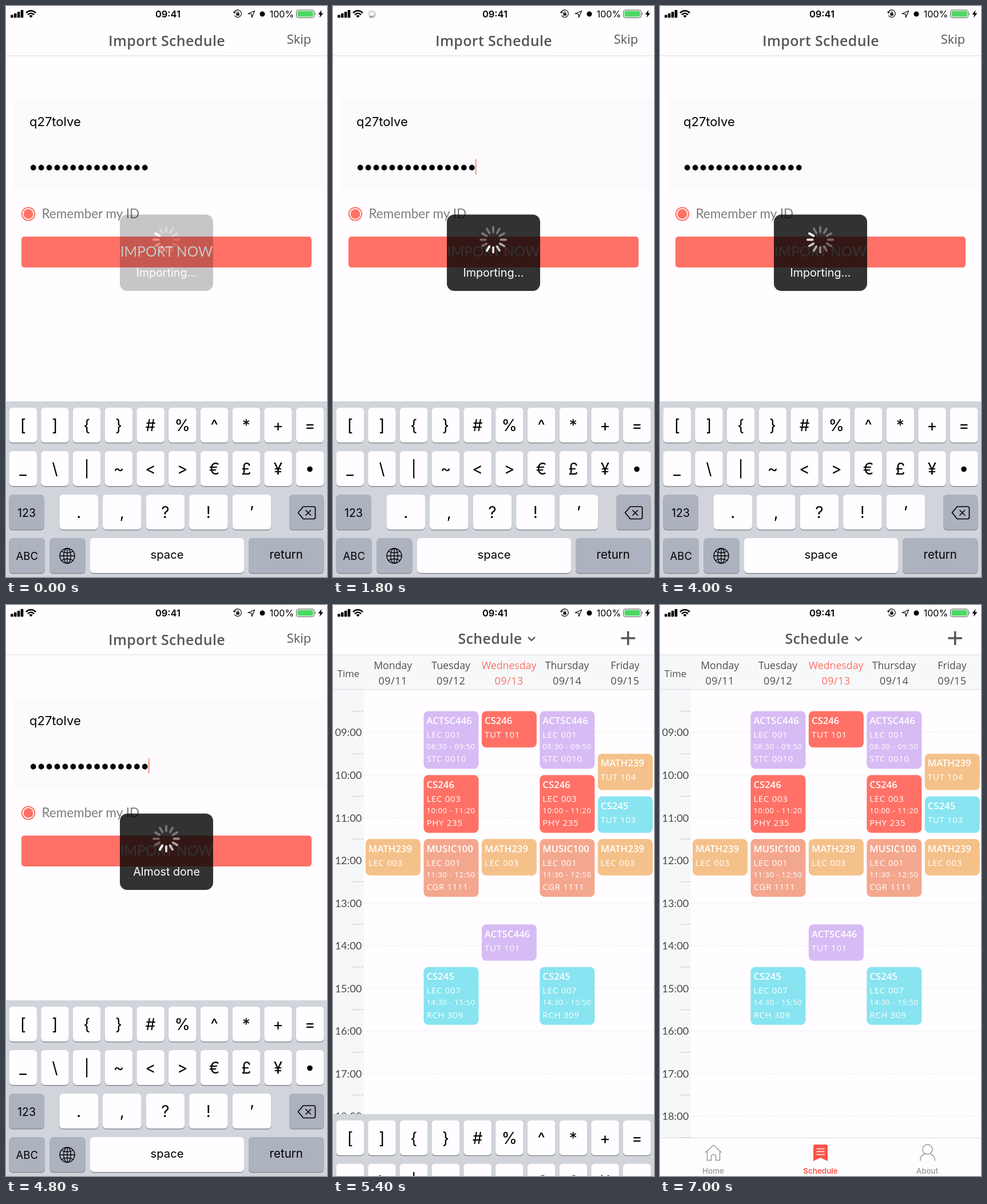
Animation of 561 by 998 pixels, one loop 7.2 s. Source, as an HTML page:

```html
<!DOCTYPE html>
<html lang="en">
<head>
<meta charset="utf-8">
<title>Import Schedule</title>
<style>
html, body { margin: 0; width: 100%; height: 100%; overflow: hidden; background: #fffdff; }
svg { display: block; width: 561px; height: 998px; }
text { white-space: pre; }
.ui { font-family: Inter, Roboto, sans-serif; }
.hand { font-family: "Open Sans", "Noto Sans", sans-serif; }
.soft { font-family: Lato, sans-serif; }
</style>
</head>
<body>
<svg id="stage" viewBox="0 0 561 998"></svg>
<script>
const LOOP = 7200, STEP = 200;
const CORAL = '#ff7166', INK = '#565658', LINE = '#d9d9dc';

const rect = (x, y, w, h, fill, r = 0, more = '') =>
  `<rect x="${x}" y="${y}" width="${w}" height="${h}" rx="${r}" fill="${fill}" ${more}/>`;
const circle = (x, y, r, fill, more = '') =>
  `<circle cx="${x}" cy="${y}" r="${r}" fill="${fill}" ${more}/>`;
const stroke = (d, color, width = 1, more = '') =>
  `<path d="${d}" fill="none" stroke="${color}" stroke-width="${width}" ${more}/>`;
const fillPath = (d, color) => `<path d="${d}" fill="${color}"/>`;
const text = (x, y, s, size, { font = 'ui', fill = '#000', anchor = 'middle', weight = 400, gap = 0 } = {}) =>
  `<text x="${x}" y="${y}" class="${font}" font-size="${size}" fill="${fill}" text-anchor="${anchor}" ` +
  `font-weight="${weight}" letter-spacing="${gap}">${s.replace(/&/g, '&amp;').replace(/</g, '&lt;')}</text>`;
const times = (n, fn) => Array.from({ length: n }, (_, i) => fn(i)).join('');
const group = (id, body) => `<g id="${id}">${body}</g>`;

const spinner = (id, x, y, inner, outer, width, color, cap) => group(id, times(12, i =>
  `<line x1="${x}" x2="${x}" y1="${y - inner}" y2="${y - outer}" stroke="${color}" stroke-width="${width}" ` +
  `stroke-linecap="${cap}" transform="rotate(${i * 30} ${x} ${y})"/>`));

function statusBar() {
  const bars = times(4, i => rect(8 + i * 5.9, 15.5 - i * 2.8, 4.6, 5 + i * 2.8, '#000', 1.2));
  const wifi = stroke('M35 12 Q43.5 4.5 52 12 M38 15.2 Q43.5 10.3 49 15.2', '#000', 2.6) +
    fillPath('M40.3 17.3 Q43.5 14.6 46.7 17.3 L43.5 20.6Z', '#000');
  const lock = stroke('M399.4 10 A6.4 6.4 0 1 1 399.4 16.5', '#000', 1.2) + fillPath('M397 10 H402 L399 13.4Z', '#000') +
    rect(402.4, 12.6, 5.4, 4.2, '#000', .6) + stroke('M403.6 13 V11.4 A1.5 1.5 0 0 1 406.6 11.4 V13', '#000', 1);
  const arrow = stroke('M423 13.5 L434.5 8.5 L429.5 20 L429 14Z', '#000', 1.2, 'stroke-linejoin="round"');
  const battery = rect(507.5, 7, 31, 13.5, 'none', 3.2, 'stroke="#555" stroke-width="1"') +
    rect(509.3, 8.8, 27.4, 9.9, '#4cd964', 1.8) + fillPath('M540 11.5 Q542.6 13.7 540 16Z', '#555');
  return bars + wifi + text(283, 20, '09:41', 16.5, { weight: 600 }) + lock + arrow +
    circle(448, 14, 4.5, '#000') + text(482, 20, '100%', 16.1) + battery +
    fillPath('M551.5 7 L545.5 14.7 H549.3 L548 20.5 L554.5 12.5 H550.6Z', '#000');
}

function importPage() {
  return rect(0, 0, 561, 998, '#fffdff') + rect(0, 86.5, 561, 1, LINE) +
    text(281, 69.5, 'Import Schedule', 25, { font: 'hand', weight: 600, fill: INK, gap: .35 }) +
    text(512, 65.5, 'Skip', 22, { font: 'hand', fill: INK }) +
    rect(14, 162, 547, 160, '#fcfafd') +
    text(41, 210, 'q27tolve', 22, { anchor: 'start' }) +
    times(15, i => circle(47.7 + i * 13.93, 282.5, 4.9, '#000')) +
    rect(248.6, 267.5, 2, 27, '#f8917f', 0, 'id="caret"') +
    circle(39, 363.5, 11.2, 'none', `stroke="${CORAL}" stroke-width="2"`) + circle(39, 363.5, 8.4, CORAL) +
    text(62.5, 371, 'Remember my ID', 22.5, { font: 'soft', fill: '#7c7b7d', anchor: 'start' }) +
    rect(27, 403, 507, 54, CORAL, 5) +
    text(280.5, 438, 'IMPORT NOW', 24.4, { font: 'soft', fill: '#fff' });
}

const HOUR = 74.55, COLUMN = 101.45;
const hourY = h => 222.7 + (h - 9) * HOUR;
const COLORS = { ACTSC446: '#d7bbf4', CS246: CORAL, MATH239: '#f5c18a', MUSIC100: '#f4a78f', CS245: '#87e4f0' };

// Sessions with a room last 80 minutes and show their hours; the others last 50.
function session(day, start, course, kind, span, room) {
  const x = 57 + day * COLUMN, y = hourY(start);
  const line = (dy, s, size, gap, weight) =>
    text(x + 5, y + dy, s, size, { font: 'hand', fill: '#fff', anchor: 'start', weight, gap });
  return rect(x, y, 96, (room ? 80 : 50) / 60 * HOUR + 1.5, COLORS[course], 8) +
    line(22.5, course, 16.6, .1, 600) + line(46.5, kind, 15, .7, 500) +
    (room ? line(66.5, span, 13, .6, 500) + line(89, room, 15, .7, 500) : '');
}

function tabBar() {
  const gray = '#98979a';
  const label = (x, s, fill, weight) => text(x, 993.5, s, 13.4, { fill, weight });
  return rect(0, 931, 561, 67, '#fdfcfe') + rect(0, 931, 561, 1, LINE) +
    stroke('M79.5 957 L93.5 944 L107.5 957 M82.5 955 V970.5 H89.5 V962.5 Q93.5 958 97.5 962.5 V970.5 H104.5 V955',
      gray, 1.5, 'stroke-linejoin="round"') +
    fillPath('M268 946 Q268 943 271 943 H290 Q293 943 293 946 V972 L280.5 966 L268 972Z', '#fb5449') +
    stroke('M273.5 950.5 H287.5 M273.5 955.5 H287.5 M273.5 960.5 H287.5', '#fff', 1.3) +
    circle(467.5, 951.5, 8.6, 'none', `stroke="${gray}" stroke-width="1.5"`) +
    stroke('M454.5 971.5 Q455 961 463 959.5 M472 959.5 Q480 961 480.5 971.5', gray, 1.5) +
    label(93, 'Home', gray, 500) + label(280.5, 'Schedule', '#fb5449', 600) + label(467, 'About', gray, 500);
}

function schedulePage() {
  const days = ['Monday', 'Tuesday', 'Wednesday', 'Thursday', 'Friday'];
  const head = days.map((day, i) => {
    const x = 104.7 + i * COLUMN, style = { font: 'hand', fill: i === 2 ? CORAL : '#4e4e50', weight: 500 };
    return text(x, 112, day, 17.7, style) + text(x, 139, `09/${11 + i}`, 18, { ...style, gap: .5 });
  }).join('');
  const grid = times(10, i => {
    const y = hourY(9 + i);
    return stroke(`M54 ${y} H561`, '#e6e5e9', 1, 'stroke-dasharray="3 2"') +
      text(3.5, y + 6.7, `${String(9 + i).padStart(2, '0')}:00`, 18.2, { font: 'soft', fill: '#48484a', anchor: 'start' });
  }) + times(11, i => stroke(`M34 ${hourY(8.5 + i)} H54`, '#aeb0b3', 1, 'stroke-dasharray="3.2 2"'));
  const pair = (...args) => session(1, ...args) + session(3, ...args);
  return rect(0, 0, 561, 998, '#fffdff') + rect(0, 87, 54, 845, '#f5f7f9') + rect(54, 87, 507, 60, '#f7f8fa') +
    rect(0, 86.5, 561, 1, LINE) + rect(0, 147, 561, 1, LINE) +
    text(274.5, 67.5, 'Schedule', 25, { font: 'hand', weight: 600, fill: INK, gap: .35 }) +
    stroke('M341 56 L347 62 L353 56', INK, 2.4) + stroke('M503.5 58 H528 M515.7 46 V70', INK, 3.6) +
    text(27, 126, 'Time', 16.7, { font: 'hand', fill: '#4e4e50', weight: 500 }) + head + grid +
    pair(8.5, 'ACTSC446', 'LEC 001', '08:30 - 09:50', 'STC 0010') +
    pair(10, 'CS246', 'LEC 003', '10:00 - 11:20', 'PHY 235') +
    pair(11.5, 'MUSIC100', 'LEC 001', '11:30 - 12:50', 'CGR 1111') +
    pair(14.5, 'CS245', 'LEC 007', '14:30 - 15:50', 'RCH 309') +
    [0, 2, 4].map(day => session(day, 11.5, 'MATH239', 'LEC 003')).join('') +
    session(2, 8.5, 'CS246', 'TUT 101') + session(2, 13.5, 'ACTSC446', 'TUT 101') +
    session(4, 9.5, 'MATH239', 'TUT 104') + session(4, 10.5, 'CS245', 'TUT 103') + tabBar();
}

function keyboard() {
  const key = (x, row, w, s = '', size = 28, rise = 41, dark = false) => {
    const y = 702 + row * 76;
    return rect(x, y + 1.5, w, 61, '#898c92', 6) + rect(x, y, w, 61, dark ? '#acb2be' : '#fffdff', 6) +
      text(x + w / 2, y + rise, s, size);
  };
  const row = (chars, r, x, step, w) => [...chars].map((c, i) => key(x + i * step, r, w, c)).join('');
  return rect(0, 691, 561, 307, '#d1d4db') +
    row('[]{}#%^*+=', 0, 5.5, 55.72, 48.5) + row('_\\|~<>€£¥', 1, 5.5, 55.72, 48.5) +
    key(507, 1, 48.5) + circle(531, 809.5, 4.8, '#000') +
    key(5.5, 2, 61, '123', 19.5, 38.5, true) + row('.,?!’', 2, 93.5, 75.55, 67.5) + key(495, 2, 60.5, '', 20, 0, true) +
    stroke('M510.5 885.5 L519.5 875 H537.5 Q540.5 875 540.5 878 V893.5 Q540.5 896.5 537.5 896.5 H519.5Z ' +
      'M523.5 881 L533 890.5 M533 881 L523.5 890.5', '#000', 1.7, 'stroke-linejoin="round"') +
    key(5.5, 3, 62.5, 'ABC', 18.5, 38, true) + key(76.5, 3, 62, '', 20, 0, true) +
    stroke('M94 961 H120 M107 948 V974 M97 953 Q107 958.5 117 953 M97 969 Q107 963.5 117 969', '#000', 1.3) +
    circle(107, 961, 13, 'none', 'stroke="#000" stroke-width="1.4"') +
    '<ellipse cx="107" cy="961" rx="6.3" ry="13" fill="none" stroke="#000" stroke-width="1.3"/>' +
    key(147, 3, 269, 'space', 20.3, 36) + key(424, 3, 131.5, 'return', 20.5, 36, true);
}

const hudBox = rect(199, 364.5, 163, 133.5, '#000', 13, 'fill-opacity=".8"') +
  spinner('wheel', 280, 408.5, 13.5, 22, 3.8, '#fff', 'round') +
  text(280.5, 473, 'Importing...', 19.7, { fill: '#fff' }).replace('<text', '<text id="message"');

const $ = id => document.getElementById(id);
$('stage').innerHTML = group('import', importPage()) + group('schedule', schedulePage()) + statusBar() +
  spinner('network', 68, 14, 3.6, 7, 1.3, '#333', 'butt') + group('keys', keyboard()) + group('hud', hudBox);

const show = (id, on) => $(id).setAttribute('visibility', on ? 'visible' : 'hidden');
const clamp = v => Math.max(0, Math.min(1, v));

function spin(id, t) {
  const head = Math.floor(t * 12 / 1000) + 10;
  [...$(id).children].forEach((spoke, i) => {
    const age = ((head - i) % 12 + 12) % 12;
    spoke.setAttribute('opacity', Math.max(.33, 1 - age * .13));
  });
}

function draw(now) {
  const t = Math.floor(now % LOOP / STEP) * STEP;
  const imported = t >= 5000;
  show('import', !imported);
  show('schedule', imported);
  show('caret', !imported && t % 1000 >= 400);
  show('network', t >= 200 && t < 3800);
  spin('wheel', t);
  spin('network', t);

  $('message').textContent = t < 4400 ? 'Importing...' : 'Almost done';
  $('hud').setAttribute('opacity', Math.min(clamp(.27 + t / 300), clamp(.18 + (5000 - t) / 240)));

  // Critically damped slide out of view.
  const k = Math.max(0, t - 5200) * .011;
  const slide = t >= 6000 ? 1 : 1 - (1 + k) * Math.exp(-k);
  $('keys').setAttribute('transform', `translate(0 ${308 * slide})`);
  requestAnimationFrame(draw);
}
requestAnimationFrame(draw);
</script>
</body>
</html>
```
